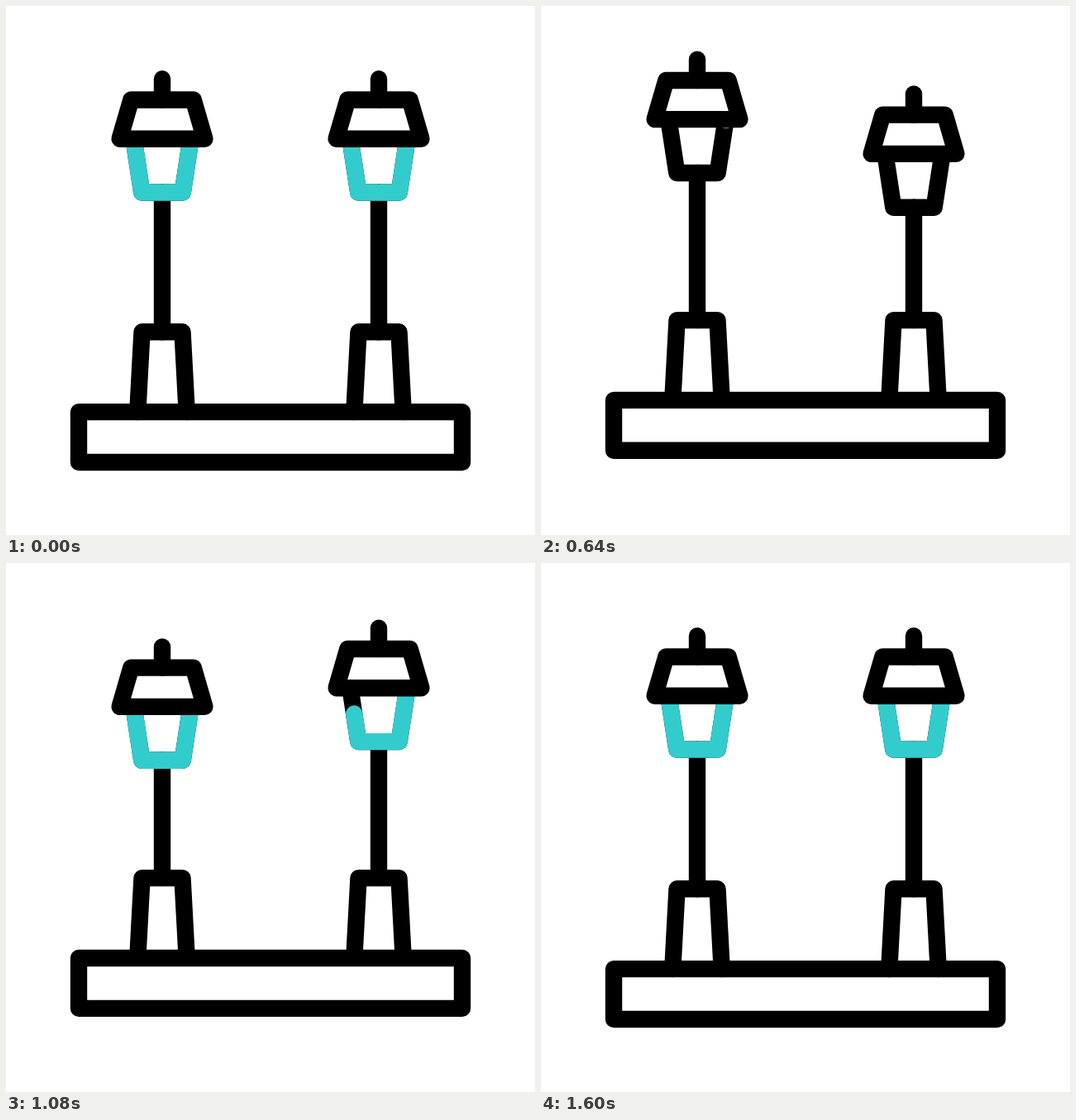
These frames come from a looping animation (640x640 px, 1.88 s). An HTML page with a canvas:

```html
<!DOCTYPE html>
<html lang="en">
<head>
<meta charset="utf-8">
<title>Street lamps</title>
<style>
  html, body { margin: 0; width: 100%; height: 100%; overflow: hidden; background: #fff; }
  canvas { display: block; }
</style>
</head>
<body>
<canvas width="640" height="640"></canvas>
<script>
const ctx = document.querySelector('canvas').getContext('2d');
const LOOP = 1880, STEP = 40, DELAY = 160;
const TEAL = '#33cccc', BLACK = '#000';

const ramp = (t, from, to) => Math.min(1, Math.max(0, (t - from) / (to - from)));
const ease = (t, from, to) => {
  const u = ramp(t, from, to);
  return u * u * (3 - 2 * u);
};

// The ground rises and sinks back; each lamp dips, jumps, dips and settles
const groundLift = t => -16.6 * (ease(t, 170, 787) - ease(t, 885, 1552));
const lampBounce = t =>
  32.4 * ease(t, 210, 482) - 65.9 * ease(t, 482, 750) +
  61.1 * ease(t, 778, 1026) - 27.6 * ease(t, 1026, 1445);

// Open outline mirrored about x = 0: right end, right corner, left corner, left end
const trapezoid = (endX, endY, cornerX, cornerY) =>
  [[endX, endY], [cornerX, cornerY], [-cornerX, cornerY], [-endX, endY]];

function line(points, color = BLACK, closed = false) {
  ctx.beginPath();
  points.forEach(([x, y]) => ctx.lineTo(x, y));
  if (closed) ctx.closePath();
  ctx.strokeStyle = color;
  ctx.stroke();
}

// Strokes only the part of a line between two fractions of its length
function trimmed(points, from, to, color) {
  if (to <= from) return;
  const length = points.slice(1).reduce((sum, [x, y], i) =>
    sum + Math.hypot(x - points[i][0], y - points[i][1]), 0);
  ctx.setLineDash([(to - from) * length, 9999]);
  ctx.lineDashOffset = -from * length;
  line(points, color);
  ctx.setLineDash([]);
}

function shifted(dx, dy, draw) {
  ctx.save();
  ctx.translate(dx, dy);
  draw();
  ctx.restore();
}

function lamp(t) {
  const bounce = lampBounce(t);
  const lantern = trapezoid(34.5, 161.4, 24.7, 225.6);
  line([[0, 225.6 + bounce], [0, 394.3]]);
  line(trapezoid(29.7, 491, 24.5, 394.3));
  shifted(0, bounce, () => {
    line(lantern);
    trimmed(lantern, ramp(t, 0, 320) ** 1.5, 1, TEAL);
    trimmed(lantern, 0, ramp(t, 638, 958) ** 1.5, TEAL);
    line([[0, 88.2], [0, 113.5]]);
    line(trapezoid(51.4, 160.7, 37.7, 113.5), BLACK, true);
  });
}

// Three rays fan out to the left of the origin
function rays(t) {
  const from = ease(t, 1300, 1590), to = ease(t, 1120, 1365);
  for (const side of [-1, 0, 1]) {
    const x = side ? -210 : -216, reach = side ? 30 : 41.5;
    trimmed([[x, 196.5 + 36 * side], [x - reach, 196.5 + (36 + reach) * side]], from, to, TEAL);
  }
}

function render(t) {
  ctx.fillStyle = '#fff';
  ctx.fillRect(0, 0, 640, 640);
  ctx.lineWidth = 20.4;
  ctx.lineCap = ctx.lineJoin = 'round';
  shifted(320, groundLift(t), () => {
    shifted(-131, 0, () => lamp(t));
    shifted(131, 0, () => lamp(t - DELAY));
    ctx.strokeStyle = BLACK;
    ctx.strokeRect(-232, 491.1, 464, 60.9);
  });
  shifted(320, 0, () => rays(t));
  shifted(312, 0, () => {
    ctx.scale(-1, 1);
    rays(t);
  });
}

const start = performance.now();
(function tick() {
  const elapsed = performance.now() - start + 8;
  render(Math.floor(elapsed % LOOP / STEP) * STEP);
  requestAnimationFrame(tick);
})();
</script>
</body>
</html>
```
